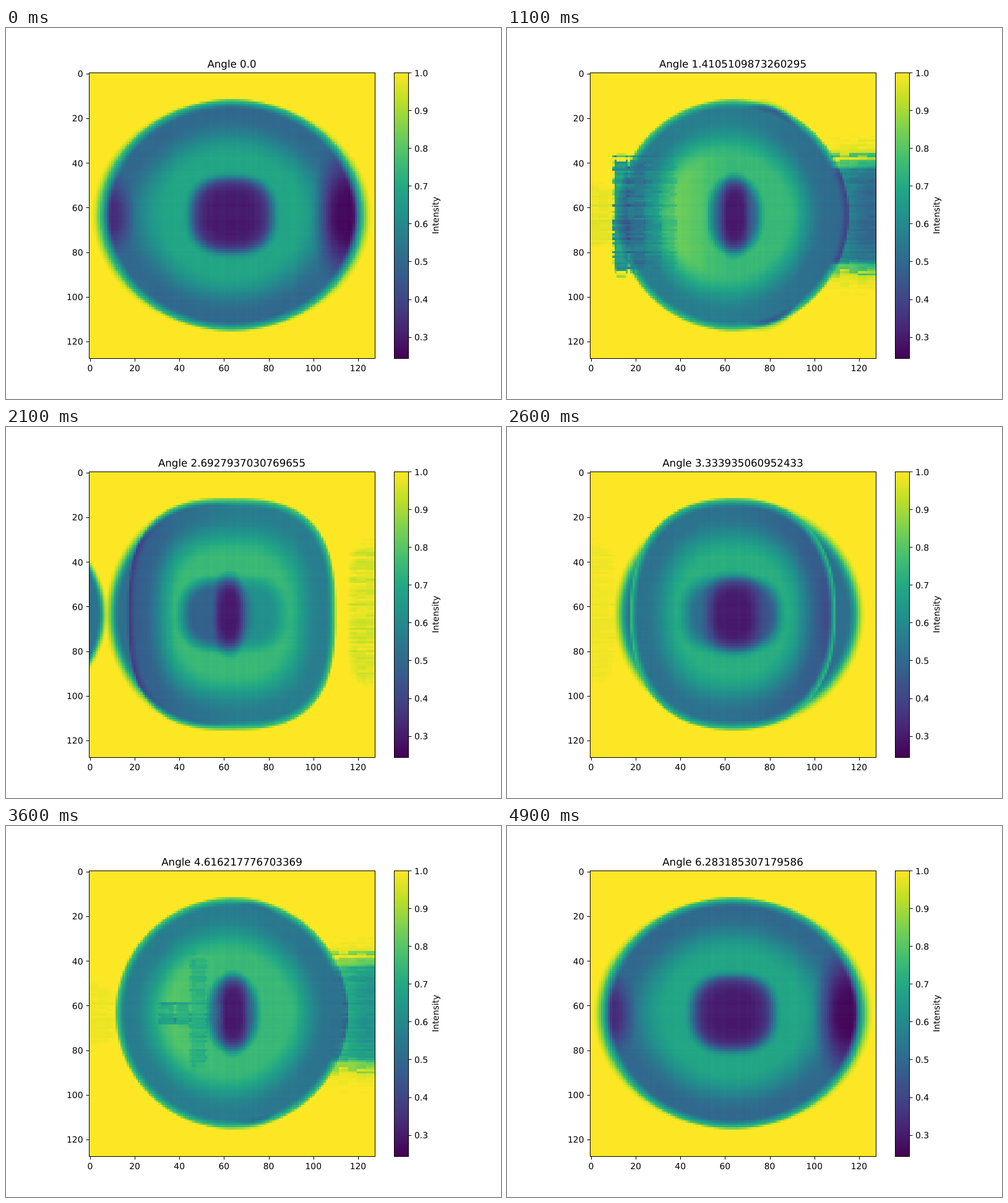
These frames come from a looping animation (800 by 600 pixels, 5 s). An HTML page with a canvas:

```html
<!DOCTYPE html>
<html lang="en">
<head>
<meta charset="utf-8">
<title>Rotating intensity map</title>
<style>
  html, body { margin: 0; width: 100%; height: 100%; overflow: hidden; background: #fff; }
  #map { position: absolute; left: 134px; top: 72px; width: 462px; height: 462px; image-rendering: pixelated; }
  svg { position: absolute; left: 0; top: 0; }
  text { font: 13.89px "DejaVu Sans", sans-serif; fill: #000; text-rendering: geometricPrecision; }
  #title { font-size: 16.67px; }
  .line { fill: none; stroke: #000; stroke-width: 1; }
</style>
</head>
<body>
<canvas id="map" width="128" height="128"></canvas>
<svg id="plot" width="800" height="600" viewBox="0 0 800 600">
  <defs><linearGradient id="ramp" x1="0" y1="1" x2="0" y2="0"></linearGradient></defs>
  <rect x="627" y="72" width="23.5" height="462" fill="url(#ramp)"/>
  <rect class="line" x="134.5" y="72.5" width="462" height="462"/>
  <rect class="line" x="627.5" y="72.5" width="23" height="462"/>
  <text id="title" x="365" y="64" text-anchor="middle">Angle 0.0</text>
  <text transform="translate(699 303) rotate(-90)" text-anchor="middle">Intensity</text>
</svg>
<script>
const SIZE = 128, CELL = 462 / SIZE, LOW = 0.2438, MID = 63.5;
const FRAMES = 50, STEP = 2 * Math.PI / (FRAMES - 1);
const COLORS = ['#440154', '#482475', '#414487', '#355f8d', '#2a788e', '#21918c',
  '#22a884', '#44bf70', '#7ad151', '#bddf26', '#fde725'];

const mix = (a, b, t) => a + (b - a) * t;
const clamp = (t, lo = 0, hi = 1) => Math.min(hi, Math.max(lo, t));
const smooth = t => (t = clamp(t)) * t * (3 - 2 * t);
const hash = (x, y) => {
  const s = Math.sin(x * 127.1 + y * 311.7) * 43758.5453;
  return (s - Math.floor(s)) * 2 - 1;
};
const radius = (dx, dy, p) => Math.pow(Math.pow(Math.abs(dx), p) + Math.pow(Math.abs(dy), p), 1 / p);

const rgb = COLORS.map(c => [1, 3, 5].map(i => parseInt(c.slice(i, i + 2), 16)));
const lut = Array.from({ length: 256 }, (_, i) => {
  const t = i / 25.5, k = Math.min(9, Math.floor(t));
  return rgb[k].map((c, j) => mix(c, rgb[k + 1][j], t - k));
});

// A soft superellipse between x0 and x1, ry tall, with an optional rough grain.
function spot(x0, x1, ry, value, { soft = .3, p = 2, rough = 0, amount = 1, cy = MID } = {}) {
  const cx = (x0 + x1) / 2, rx = (x1 - x0) / 2;
  return (v, x, y) => {
    const dx = (x - cx) / rx, dy = (y - cy) / ry;
    if (Math.max(Math.abs(dx), Math.abs(dy)) > 1 + soft + rough) return v;
    const grain = rough ? rough * (hash(y, 3) * .6 + hash(x >> 2, y) * .4) : 0;
    const m = smooth((1 + soft - radius(dx, dy, p) * (1 + grain)) / (2 * soft));
    return mix(v, value + grain, m * amount);
  };
}

// The same, placed by its distance from the middle on the left (-1) or right (+1).
function beside(side, near, far, ...rest) {
  const a = MID + side * near, b = MID + side * far;
  return spot(Math.min(a, b), Math.max(a, b), ...rest);
}

// Two bodies circle each other: s is their spread, lean the side the second one shows on.
function sceneAt(angle) {
  const s = Math.abs(Math.sin(angle)), second = angle > Math.PI ? 1 : 0;
  const lean = clamp(2 * Math.sin(2 * angle), -1, 1);
  const grow = smooth((s - .43) / .25), open = clamp(s / .43);
  const merged = clamp(1 - s / .3);
  const back = [], skin = [], top = [];

  for (const side of [-1, 1]) {
    const amount = Math.max(0, side * lean);
    if (merged) {
      skin.push(beside(side, 44 + side * -3, 62, 18 + side * 4, .3 - side * .04,
        { soft: .7, amount: merged }));
    }
    if (!amount) continue;
    const edge = 75 - 40 * s, end = edge + mix(80, 120, grow), out = amount * grow;
    back.push(
      beside(side, 36, 160, 33, .94, { soft: .08, p: 8, rough: .06, amount: out }),
      beside(side, 36, 160, 26, .74, { soft: .04, p: 8, rough: .1, amount: out }),
      beside(side, edge, end, mix(40, 21, grow), .53 - .07 * side * grow,
        { soft: .06, p: mix(2, 8, grow), rough: .03 * grow, amount }),
      beside(side, 54, 82, 21, .38, { soft: .5, p: 4, amount: out * .7 }));
    top.push(beside(-side, 53, 90, mix(32, 14, grow), .96,
      { soft: .1, p: 5, rough: .04, amount: amount * open }));
    if (side > 0) {
      for (let k = 0; k < 4; k++) {
        const x = 10 + 21 * second + 7 * k;
        const tall = second ? 5 + 19 * (k === 2) : 25;
        top.push(spot(x, x + 7, tall, mix(.45, .64, second ? .6 : k / 3),
          { soft: .06, p: 8, rough: .13, amount: out * (1 - .2 * k) }));
      }
    }
  }

  const capMid = MID + 19 * s * lean, capHalf = 58.5 - 30 * s;
  back.push(spot(capMid - capHalf, capMid + capHalf, 49, .52, { soft: .08 }));

  // The dark hollow: a pale near half that closes, a far half, and a pit between them.
  const near = mix(22, 3.5, smooth((s - .43) / .3)) + 8 * s ** 6, far = 22 - 10 * s ** 6;
  const span = (a, b) => {
    const t = (lean + 1) / 2;
    return [MID + mix(-b, a, t), MID + mix(-a, b, t)];
  };
  skin.push(
    spot(...span(-near, far * .6), 15, mix(.42, .62, open), { p: 2.6 }),
    spot(...span(-8, far), 14.5, mix(.42, .48, open), { p: 2.4 }),
    spot(...span(mix(-15, -4.5, open), mix(15, 7, open)), 14.5, .3, { soft: .45, p: 2.6 }));

  return {
    back, skin, top, lean, grow, merged,
    half: 42 + 10 * s + 16.5 * merged * merged,
    square: 2 + .85 * Math.pow(Math.sin(Math.PI * s), 1.5),
    core: mix(.69, .75, open),
    ring: mix(.5, .56, open)
  };
}

const paint = (v, spots, x, y) => spots.reduce((u, f) => f(u, x, y), v);

function valueAt(x, y, sc) {
  const dx = (x - MID) / sc.half, dy = (y - 63.4) / 51.7;
  const r = radius(dx, dy, sc.square);
  const cover = clamp((1 - r) * 50 + .5);
  let v = paint(1, sc.back, x, y);
  if (cover > 0) {
    const toward = sc.lean * dx, shade = Math.max(0, toward);
    const core = sc.core + .08 * sc.grow * smooth(-toward * 3);
    const ring = sc.ring - .1 * shade;
    const inner = .5 - .14 * shade * sc.grow;
    let b = mix(core, ring, smooth((r - inner) / .36));
    b = paint(b, sc.skin, x, y);
    // The rim glows against the light and darkens in front of the other body.
    const rim = mix(.36, .82, smooth((v - .6) / .3));
    b = mix(b, sc.merged ? .8 : rim, .85 * smooth((r - .92) / .08));
    b += (hash(y, 3) + hash(7, x)) * .006;
    v = mix(v, b, cover);
  }
  return paint(v, sc.top, x, y);
}

const ctx = document.getElementById('map').getContext('2d');
const image = ctx.createImageData(SIZE, SIZE);
const title = document.getElementById('title');

function draw(frame) {
  const angle = frame === FRAMES - 1 ? 2 * Math.PI : frame * STEP;
  const scene = sceneAt(angle);
  for (let y = 0, i = 0; y < SIZE; y++) {
    for (let x = 0; x < SIZE; x++, i += 4) {
      const t = clamp((valueAt(x, y, scene) - LOW) / (1 - LOW));
      image.data.set([...lut[Math.round(t * 255)], 255], i);
    }
  }
  ctx.putImageData(image, 0, 0);
  title.textContent = 'Angle ' + (frame ? angle : '0.0');
}

const plot = document.getElementById('plot');
function add(parent, tag, attrs, text) {
  const el = document.createElementNS(plot.namespaceURI, tag);
  for (const k in attrs) el.setAttribute(k, attrs[k]);
  if (text !== undefined) el.textContent = text;
  parent.appendChild(el);
}
const tick = d => add(plot, 'path', { class: 'line', d });
const label = (x, y, anchor, text) => add(plot, 'text', { x, y: Math.round(y), 'text-anchor': anchor }, text);

COLORS.forEach((c, i) => add(document.getElementById('ramp'), 'stop', { offset: i / 10, 'stop-color': c }));
for (let n = 0; n <= 120; n += 20) {
  const at = (n + .5) * CELL;
  tick(`M${Math.round(134 + at) + .5} 535v4.5`);
  label(134 + at, 555, 'middle', n);
  tick(`M134 ${Math.round(72 + at) + .5}h-4.5`);
  label(124.5, 72 + at + 5.5, 'end', n);
}
for (let n = 3; n <= 10; n++) {
  const y = 72 + 462 * (1 - n / 10) / (1 - LOW);
  tick(`M651 ${Math.round(y) + .5}h4.5`);
  label(660, y + 5.5, 'start', (n / 10).toFixed(1));
}

let shown = -1;
function loop() {
  const frame = Math.floor(performance.now() % 5000 / 100);
  if (frame !== shown) draw(shown = frame);
  requestAnimationFrame(loop);
}
loop();
</script>
</body>
</html>
```
